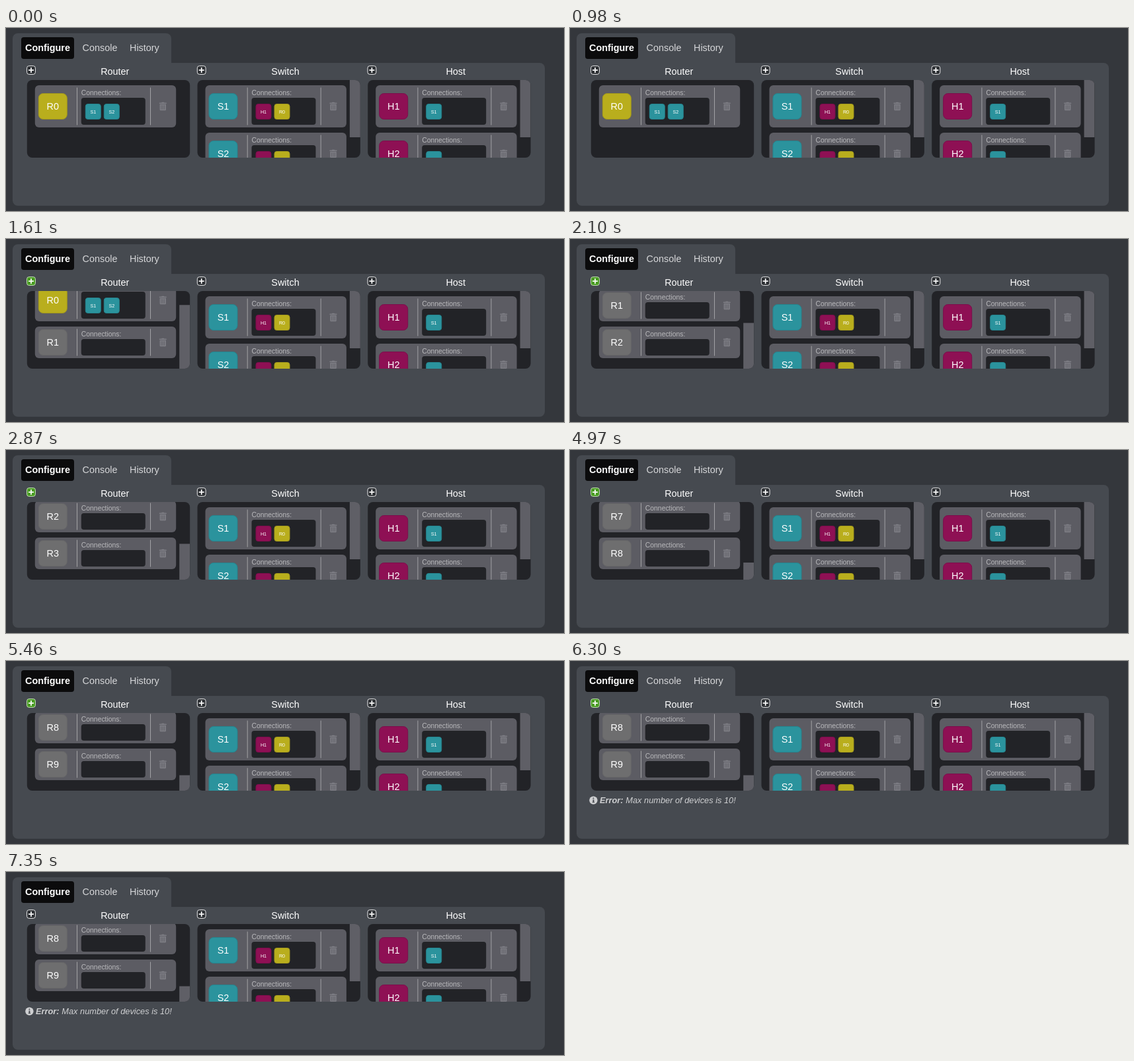
Recreate the animation shown at these times as an HTML page with a canvas. Size 844x278 px, loop 7420 ms.

```html
<!DOCTYPE html>
<html lang="en">
<head>
<meta charset="utf-8">
<title>Network devices</title>
<style>
html, body { margin: 0; width: 100%; height: 100%; overflow: hidden; background: #34373c; }
canvas { display: block; }
</style>
</head>
<body>
<canvas id="stage" width="844" height="278"></canvas>
<script>
const ctx = document.getElementById('stage').getContext('2d');
const LOOP = 7420, STEP = 70;
const VIEW = { y: 79, h: 118, w: 246.4, pitch: 257.7 };
const FONT = '"Liberation Sans", Arial, sans-serif';
const FILL = { R: '#b9ae1d', S: '#2b939d', H: '#8e1054', off: '#6e6e6f' };
const EDGE = { R: '#a2981c', S: '#25848e', H: '#7b0d4b', off: '#676768' };

// Times at which routers R1 to R9 are added, then the refused click.
const clicks = [1540, 2100, 2590, 3080, 3500, 3920, 4340, 4760, 5250];
const HOVER = [1260, 6510], ERROR_AT = 5950;

const switches = [
  { name: 'S1', links: ['H1', 'R0'] },
  { name: 'S2', links: ['H2', 'R0'] }
];
const hosts = [
  { name: 'H1', links: ['S1'] },
  { name: 'H2', links: ['S2'] }
];

function box(x, y, w, h, r, fill, stroke) {
  ctx.beginPath();
  ctx.roundRect(x, y, w, h, r);
  if (fill) { ctx.fillStyle = fill; ctx.fill(); }
  if (stroke) { ctx.strokeStyle = stroke; ctx.stroke(); }
}

function line(x1, y1, x2, y2, color, width = 1) {
  ctx.beginPath();
  ctx.moveTo(x1, y1);
  ctx.lineTo(x2, y2);
  ctx.strokeStyle = color;
  ctx.lineWidth = width;
  ctx.stroke();
  ctx.lineWidth = 1;
}

function label(str, x, y, size, color = '#fff', align = 'left', style = '') {
  ctx.font = `${style} ${size}px ${FONT}`;
  ctx.textAlign = align;
  ctx.fillStyle = color;
  ctx.fillText(str, x, y);
}

function tile(name, x, y, w, h, r, size, kind) {
  box(x + 0.5, y + 0.5, w - 1, h - 1, r, FILL[kind], EDGE[kind]);
  label(name, x + w / 2, y + h / 2 + size * 0.36, size, '#fff', 'center');
}

function trash(x, y) {
  const color = '#7d7d84';
  box(x - 5.5, y - 5.5, 11, 1.5, 0.5, color);
  box(x - 2, y - 6.3, 4, 1.2, 0.5, color);
  box(x - 4.7, y - 3.2, 9.4, 9.4, [0, 0, 1.2, 1.2], color);
  for (const dx of [-2.4, 0, 2.4]) line(x + dx, y - 1.8, x + dx, y + 4.8, '#5c5c63', 0.8);
}

function plus(x, y, hot) {
  box(x - 6.4, y - 6.4, 12.8, 12.8, 3.2, hot ? '#499b22' : '#2d3034', hot ? '#c5dfba' : '#e9e9ea');
  line(x - 4, y, x + 4, y, '#fff', 1.7);
  line(x, y - 4, x, y + 4, '#fff', 1.7);
}

const rowHeight = d => d.links.length ? 64 : 48;

function row(d, x, y) {
  const h = rowHeight(d), mid = y + h / 2;
  box(x, y, 213.4, h, 6, '#5c5c63');
  tile(d.name, x + 5, mid - 20, 44, 40, 7, 14.4, d.links.length ? d.name[0] : 'off');
  line(x + 63.7, y + 3.5, x + 63.7, y + h - 3.5, '#a2a2a5');
  line(x + 174.7, y + 3.5, x + 174.7, y + h - 3.5, '#a2a2a5');
  label('Connections:', x + 70, y + 15.3, 10.4, '#b9b9bc');
  box(x + 70, y + 19, 97, h - 23, 4, '#222327');
  d.links.forEach((n, i) => tile(n, x + 76 + 28 * i, y + 28, 24, 24, 3.5, 7.2, n[0]));
  trash(x + 193.5, mid);
}

function column(i, title, list, hot) {
  const x = 31.8 + VIEW.pitch * i;
  plus(x + 6.2, 64, hot);
  label(title, x + 133, 71, 14.4, '#fff', 'center');

  const total = 16 + list.reduce((s, d) => s + rowHeight(d) + 8, 0);
  const scroll = i ? 0 : Math.max(0, total - VIEW.h);
  ctx.save();
  box(x, VIEW.y, VIEW.w, VIEW.h, 8, '#222327');
  ctx.clip();
  let y = VIEW.y + 8 - scroll;
  for (const d of list) {
    if (y + 64 > VIEW.y) row(d, x + 12, y);
    y += rowHeight(d) + 8;
  }
  if (total > VIEW.h) {
    const k = VIEW.h / total;
    box(x + VIEW.w - 16, VIEW.y + scroll * k, 16, VIEW.h * k, 0, '#5f5f66');
  }
  ctx.restore();
}

function errorLine() {
  const color = '#cfd0d2';
  ctx.beginPath();
  ctx.arc(35.4, 211.6, 6.2, 0, Math.PI * 2);
  ctx.fillStyle = color;
  ctx.fill();
  box(34.4, 207.6, 2, 2, 1, '#464a50');
  box(34.5, 210.5, 1.9, 4.4, 0, '#464a50');
  box(33.7, 214, 3.5, 1.1, 0, '#464a50');
  label('Error:', 45, 216, 12.8, color, 'left', 'italic bold');
  label('Max number of devices is 10!', 84.3, 216, 12.8, color, 'left', 'italic');
}

function draw(t) {
  ctx.fillStyle = '#34373c';
  ctx.fillRect(0, 0, 844, 278);
  box(10, 8, 240, 60, [8, 8, 0, 0], '#464a50');
  box(10, 53, 805, 217, [0, 8, 8, 8], '#464a50');
  box(23, 14, 80, 33, 4, '#0b0b0c');
  label('Configure', 29, 35, 14.4, '#fff', 'left', 'bold');
  label('Console', 115.6, 35, 14.4, '#d6d7d9');
  label('History', 187, 35, 14.4, '#d6d7d9');

  const routers = [{ name: 'R0', links: ['S1', 'S2'] }];
  clicks.forEach((at, i) => {
    if (t >= at) routers.push({ name: 'R' + (i + 1), links: [] });
  });
  column(0, 'Router', routers, t >= HOVER[0] && t < HOVER[1]);
  column(1, 'Switch', switches, false);
  column(2, 'Host', hosts, false);
  if (t >= ERROR_AT) errorLine();
}

const start = performance.now();
function tick(now) {
  const t = Math.max(0, now - start) % LOOP;
  draw(Math.floor(t / STEP) * STEP);
  requestAnimationFrame(tick);
}
draw(0);
requestAnimationFrame(tick);
</script>
</body>
</html>
```
